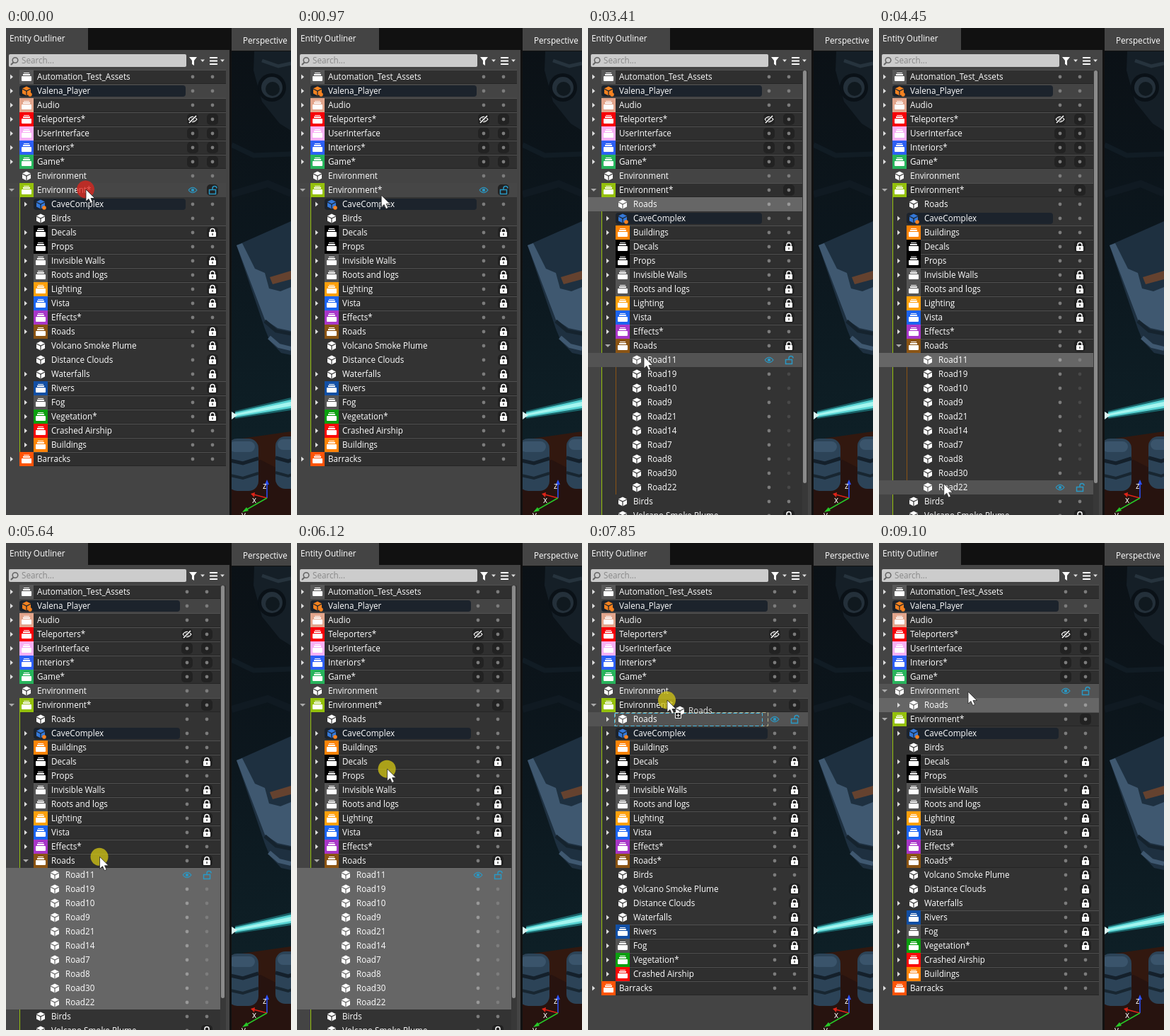
An HTML page with a canvas for the animation above (9.17 s loop, 403 px wide and 688 px high).

```html
<!DOCTYPE html>
<html lang="en">
<head>
<meta charset="utf-8">
<title>Entity Outliner</title>
<style>
html, body { margin: 0; width: 403px; height: 688px; overflow: hidden; background: #444; }
canvas { display: block; }
</style>
</head>
<body>
<canvas id="stage" width="403" height="688"></canvas>
<script>
const g = document.getElementById('stage').getContext('2d');
const LOOP = 9170, STEP = 70;
const FONT = '11.7px "Open Sans", sans-serif';
const BLUE = '#2a98c4', LIME = '#94c00c', BROWN = '#8a5414';

// Moments at which the tree changes
const CREATE = 1150, OPEN = 3080, PICK = 3720, PICK_ALL = 4620,
      DRAG = 5300, DROP = 6580, CLOSE = 7150, DRAG2 = 7420, DROP2 = 8190;

// Pointer path: time, x, y
const path = [
  [0, 113, 228], [700, 113, 229], [1300, 135, 254], [2250, 135, 254],
  [2850, 28, 449], [3120, 28, 449], [3400, 82, 465], [3800, 82, 468],
  [4480, 92, 649], [4700, 92, 649], [5180, 100, 472], [5320, 100, 472],
  [5640, 134, 442], [6400, 124, 249], [6740, 124, 249], [7050, 28, 249],
  [7200, 28, 249], [7400, 66, 250], [7490, 68, 249], [7840, 112, 222],
  [8090, 126, 210], [9170, 126, 210]
];
// Pressed button: from, to, colour
const presses = [
  [0, 200, '226,38,30'], [2960, 3120, '214,200,20'], [3640, 3800, '214,200,20'],
  [4560, 4720, '214,200,20'], [DRAG, 6530, '214,200,20'],
  [7060, 7200, '214,200,20'], [DRAG2, 8160, '214,200,20']
];

const folder = (name, color, opt = {}) => ({ name, color, arrow: true, ...opt });
const entity = (name, opt = {}) => ({ name, cube: '#fff', ...opt });
const lock = { lock: true };
const boxed = { boxA: true, boxB: true };

const top0 = [
  folder('Automation_Test_Assets', '#585858'),
  entity('Valena_Player', { cube: '#f58220', pill: true, arrow: true }),
  folder('Audio', '#e2a58c'),
  folder('Teleporters*', '#f80008', { ...boxed, hidden: true }),
  folder('UserInterface', '#f9b0f5', boxed),
  folder('Interiors*', '#2d5ff5', boxed),
  folder('Game*', '#28b45c', boxed)
];
const birds = entity('Birds');
const buildings = folder('Buildings', '#ff8408');
const beforeRoads = [
  folder('Decals', '#000', lock), folder('Props', '#000'),
  folder('Invisible Walls', '#555', lock), folder('Roots and logs', '#555', lock),
  folder('Lighting', '#ffa00c', lock), folder('Vista', '#1c64f0', lock),
  folder('Effects*', '#a836c8')
];
const afterRoads = [
  entity('Volcano Smoke Plume', lock), entity('Distance Clouds', lock),
  entity('Waterfalls', { ...lock, arrow: true }),
  folder('Rivers', '#124fa4', lock), folder('Fog', '#555', lock),
  folder('Vegetation*', '#0ca010', lock), folder('Crashed Airship', '#fa0a08')
];
const roadNumbers = [11, 19, 10, 9, 21, 14, 7, 8, 30, 22];

function tree(t) {
  const rows = [];
  const add = (lvl, ...items) => items.forEach(r => rows.push({ ...r, lvl }));
  const made = t >= CREATE, moved = t >= DROP, done = t >= DROP2;
  const shuffled = made && !done;
  const folderOpen = t >= OPEN && t < DROP;
  const entityOpen = moved && t < CLOSE;
  const all = t >= PICK_ALL;
  const children = () => roadNumbers.forEach((n, i) => add(2, entity('Road' + n, {
    inFolder: !moved, sel: all || (t >= PICK && i === 0)
  })));
  const newRoads = entity('Roads', {
    id: 'new', arrow: moved, open: entityOpen, sel: t < PICK || done
  });

  add(0, ...top0, entity('Environment', { id: 'env', arrow: done, open: done }));
  if (done) add(1, { ...newRoads, loose: true });
  add(0, folder('Environment*', LIME, { open: true, boxB: true }));
  if (made && !done) add(1, newRoads);
  if (entityOpen) children();
  add(1, entity('CaveComplex', { cube: '#3478d8', pill: true, arrow: true }));
  add(1, shuffled ? buildings : birds, ...beforeRoads);
  add(1, folder(moved ? 'Roads*' : 'Roads', BROWN,
    { ...lock, id: 'old', arrow: !moved, open: folderOpen }));
  if (folderOpen) children();
  if (shuffled) add(1, birds);
  add(1, ...afterRoads);
  if (!shuffled) add(1, buildings);
  add(0, folder('Barracks', '#ff5408'));
  rows.scrolls = folderOpen || entityOpen;
  return rows;
}

function pointer(t) {
  let i = 1;
  while (i < path.length - 1 && t > path[i][0]) i++;
  const [t0, x0, y0] = path[i - 1], [t1, x1, y1] = path[i];
  const p = Math.min(1, (t - t0) / (t1 - t0)), e = p * p * (3 - 2 * p);
  return [x0 + (x1 - x0) * e, y0 + (y1 - y0) * e];
}

// Hover stays on the grabbed row while dragging
function hoverIndex(t, rows, y) {
  const find = test => rows.findIndex(test);
  if (t >= DRAG && t < DROP) return find(r => r.name === 'Road11');
  if (t >= DROP && t < 6800) return find(r => r.id === 'old');
  if (t >= DRAG2 && t < DROP2) return find(r => r.id === 'new');
  return Math.round((y - 69) / 20);
}

function rect(x, y, w, h, c) { g.fillStyle = c; g.fillRect(x, y, w, h); }
function round(x, y, w, h, r, c) {
  g.fillStyle = c; g.beginPath(); g.roundRect(x, y, w, h, r); g.fill();
}
function disc(x, y, r, c) {
  g.fillStyle = c; g.beginPath(); g.arc(x, y, r, 0, 7); g.fill();
}
function trace(pts, close) {
  g.beginPath();
  for (let i = 0; i < pts.length; i += 2) g.lineTo(pts[i], pts[i + 1]);
  if (close) g.closePath();
}
function poly(pts, c) { trace(pts, true); g.fillStyle = c; g.fill(); }
function line(pts, c, w = 1) { trace(pts); g.strokeStyle = c; g.lineWidth = w; g.stroke(); }
function text(s, x, y, c = '#fff') {
  g.font = FONT; g.fillStyle = c; g.fillText(s, x, y);
}

function cube(x, y, c, seam) {
  poly([x, y - 6.5, x + 6, y - 3.5, x + 6, y + 3.5, x, y + 6.5, x - 6, y + 3.5, x - 6, y - 3.5], c);
  line([x - 6, y - 3, x, y, x + 6, y - 3], seam, 1.2);
  line([x, y, x, y + 6.5], seam, 1.2);
}
function stack(x, y, c) {
  rect(x - 10, y - 10, 20, 20, c);
  rect(x - 4, y - 6, 8, 1, '#fff');
  rect(x - 5, y - 4, 10, 2, '#fff');
  round(x - 7, y - 1, 14, 7, 1, '#fff');
}
function arrow(x, y, open) {
  const c = open ? '#aaa' : '#ddd';
  poly(open ? [x - 4, y - 2, x + 4, y - 2, x, y + 2] : [x - 2, y - 3.5, x + 2, y, x - 2, y + 3.5], c);
}
function eye(x, y, c) {
  g.beginPath();
  g.moveTo(x - 6, y); g.quadraticCurveTo(x, y - 7.5, x + 6, y);
  g.quadraticCurveTo(x, y + 7.5, x - 6, y);
  g.strokeStyle = c; g.lineWidth = 1.2; g.stroke();
  disc(x, y, 2.2, c);
}
function padlock(x, y, c, open) {
  const dx = open ? 3 : 0;
  g.strokeStyle = c; g.lineWidth = 1.5;
  g.beginPath();
  g.moveTo(x - 3 + dx, y);
  g.lineTo(x - 3 + dx, y - 2.5);
  g.arc(x + dx, y - 2.5, 3, Math.PI, 0);
  if (!open) g.lineTo(x + 3, y);
  g.stroke();
  if (open) g.strokeRect(x - 4.5, y - 0.5, 9, 6);
  else {
    round(x - 5, y - 1, 10, 7, 1, c);
    rect(x - 0.6, y + 1, 1.3, 3, '#333');
  }
}
function badge(x, y) { round(x - 8, y - 8, 16, 16, 5, '#222'); }

function drawRow(r, i, hover, scrolls) {
  const y = 69 + 20 * i, x = 20 * r.lvl, shift = scrolls ? 8 : 0;
  const right = 311 - shift, a = 264 - shift, b = 292 - shift;
  const lit = r.sel || hover;

  if (r.lvl) rect(20, y - 10, right - 20, 20, r.loose ? '#444' : '#333');
  if (r.color) {
    rect(x + 19, y - 10, right - x - 19, 20, '#2f2f2f');
    rect(x + 19, y - 10, right - x - 19, 1, '#515151');
    rect(x + 19, y + 9, right - x - 19, 1, '#252525');
  }
  if (lit) rect(0, y - 10, right, 20, r.sel ? '#666' : r.color && !r.lvl ? '#464646' : '#535353');
  if (r.lvl && !r.loose && !lit) rect(19, y - 10, 1, 20, LIME);
  if (r.inFolder && !lit) rect(39, y - 10, 1, 20, BROWN);
  if (r.pill) round(x + 19, y - 8, 235 - x - shift, 16, 4, '#1c232c');

  if (r.arrow) arrow(x + 8, y, r.open);
  if (r.color) stack(x + 29, y, r.color);
  else cube(x + 29, y, r.cube, r.pill ? '#1c232c' : lit ? '#666' : '#383838');
  if (r.pill) disc(x + 34, y + 5, 2.8, '#f58220');
  text(r.name, x + 44, y + 4);

  if (r.boxA) badge(a, y);
  if (r.boxB || r.lock) badge(b, y);
  const dot = lit ? '#999' : '#7c7c7c';
  if (hover) eye(a, y, BLUE);
  else if (r.hidden) {
    eye(a, y, '#fff');
    line([a - 5, y + 5, a + 5, y - 5], '#222', 3.4);
    line([a - 5, y + 5, a + 5, y - 5], '#fff', 1.6);
  } else disc(a, y, 2.4, dot);
  if (hover) padlock(b, y, BLUE, !r.lock);
  else if (r.lock) padlock(b, y, '#fff');
  else disc(b, y, 2.4, r.inFolder ? (lit ? '#7d7d7d' : '#484848') : dot);
}

function drawHeader() {
  rect(116, 0, 200, 31, '#111');
  text('Entity Outliner', 5, 19);
  round(4, 37, 251, 18, 2, '#ccc');
  g.strokeStyle = '#666'; g.lineWidth = 1.6;
  g.beginPath(); g.arc(13, 45.5, 3.8, 0, 7); g.stroke();
  line([10.5, 48.5, 7, 52], '#666', 2);
  text('Search...', 22, 50, '#888');
  poly([259, 41, 270, 41, 266, 46, 266, 53, 263, 51, 263, 46], '#fff');
  for (let k = 0; k < 3; k++) rect(288, 41 + k * 4.5, 11, 2, '#fff');
  poly([275, 44.5, 281, 44.5, 278, 48], '#ddd');
  poly([303, 44.5, 309, 44.5, 306, 48], '#ddd');
}

function boot(x, y, w) {
  round(x, y, w, 74, 14, '#2c4357');
  round(x + 3, y + 4, w - 8, 15, 8, '#3a546b');
  line([x, y + 30, x + w / 2, y + 35, x + w, y + 28], '#14202b', 5);
  line([x, y + 51, x + w / 2, y + 56, x + w, y + 49], '#182631', 4);
}

function drawViewport() {
  rect(316, 0, 87, 688, '#111');
  rect(319, 0, 84, 32, '#444');
  text('Perspective', 335, 22);
  g.save();
  g.beginPath(); g.rect(319, 33, 84, 655); g.clip();
  const sky = g.createLinearGradient(319, 33, 380, 600);
  sky.addColorStop(0, '#0b1116');
  sky.addColorStop(0.5, '#0c171e');
  sky.addColorStop(1, '#0e2027');
  rect(319, 33, 84, 655, sky);

  // Machinery overhead
  poly([351, 33, 403, 33, 403, 145, 387, 135, 362, 104, 350, 60], '#151f27');
  disc(376, 84, 20, '#0a1117');
  disc(376, 84, 15, '#24303a');
  disc(377, 86, 10, '#10191f');
  line([362, 46, 385, 54, 403, 50], '#26333d', 5);
  line([319, 165, 350, 180, 403, 178], '#111c24', 7);
  line([319, 235, 370, 220, 403, 234], '#101a22', 10);

  // Leg with worn paint
  poly([326, 307, 403, 273, 403, 462, 389, 459, 373, 442, 366, 425], '#1e3040');
  poly([326, 307, 334, 304, 352, 340, 366, 346, 372, 368, 388, 372, 403, 366,
        403, 428, 384, 424, 366, 412], '#3f5870');
  poly([373, 352, 403, 343, 403, 355, 377, 362], '#65422f');
  line([366, 414, 382, 428, 403, 432], '#15232e', 5);
  line([372, 437, 386, 449, 403, 453], '#3f5870', 6);

  poly([319, 582, 403, 570, 403, 688, 319, 688], '#32180f');
  poly([319, 625, 360, 610, 403, 632, 403, 688, 319, 688], '#27130f');

  // Energy beam
  poly([324, 541, 403, 522, 403, 540, 324, 552], 'rgba(40,180,185,.45)');
  poly([324, 543, 403, 525, 403, 537, 324, 550], '#58d2d2');
  poly([324, 545, 403, 528, 403, 534, 324, 548], '#a4f6f0');
  poly([319, 542, 327, 547, 319, 553], '#d8f4f2');
  boot(313, 580, 44);
  boot(381, 577, 36);

  // Axis gizmo
  line([369, 664, 369, 643], '#2b52ff', 1.5);
  line([369, 664, 350, 659], '#e02418', 1.5);
  line([369, 664, 339, 681], '#28c828', 1.5);
  poly([366, 645, 369, 638, 372, 645], '#2b52ff');
  poly([352, 656, 346, 658, 351, 663], '#e02418');
  poly([340, 677, 334, 684, 343, 682], '#28c828');
  text('z', 363, 651);
  text('x', 348, 671);
  text('y', 333, 692);
  g.restore();
}

function drawDrag(x, y) {
  g.setLineDash([5, 3]);
  g.lineWidth = 1;
  g.strokeStyle = '#b9b48c'; g.strokeRect(38.5, 239.5, 216, 19);
  g.strokeStyle = '#45bce8'; g.strokeRect(37.5, 240.5, 209, 18);
  g.setLineDash([]);
  cube(x + 18, y + 15, '#fff', '#444');
  round(x + 11, y + 17, 9, 9, 1, '#fff');
  rect(x + 12, y + 18, 7, 7, '#222');
  rect(x + 13, y + 21, 5, 1, '#fff');
  rect(x + 15, y + 19, 1, 5, '#fff');
  text('Roads', x + 30, y + 19, '#ddd');
}

function drawCursor(x, y) {
  const shape = [0, 0, 0, 17, 4, 13.5, 6.7, 19.5, 9.7, 18.2, 7, 12.5, 12.5, 12.5];
  const pts = shape.map((v, i) => v + (i % 2 ? y : x));
  poly(pts, '#fff');
  trace(pts, true);
  g.strokeStyle = '#222'; g.lineWidth = 0.8; g.stroke();
}

function render(t) {
  const rows = tree(t), [x, y] = pointer(t), hover = hoverIndex(t, rows, y);
  rect(0, 0, 403, 688, '#444');
  drawHeader();
  rows.forEach((r, i) => drawRow(r, i, i === hover, rows.scrolls));
  if (rows.scrolls) {
    rect(303, 60, 8, 628, '#383838');
    round(304, 60, 5, 583, 2.5, '#8b8b8b');
  }
  drawViewport();
  const press = presses.find(p => t >= p[0] && t < p[1]);
  if (press) disc(x - 0.5, y, 12.5, `rgba(${press[2]},.75)`);
  if (t >= DRAG2 + STEP && t < DROP2) drawDrag(x, y);
  drawCursor(x, y);
}

const start = performance.now();
function tick() {
  const t = (performance.now() - start) % LOOP;
  render(Math.floor(t / STEP) * STEP);
  requestAnimationFrame(tick);
}
tick();
</script>
</body>
</html>
```
